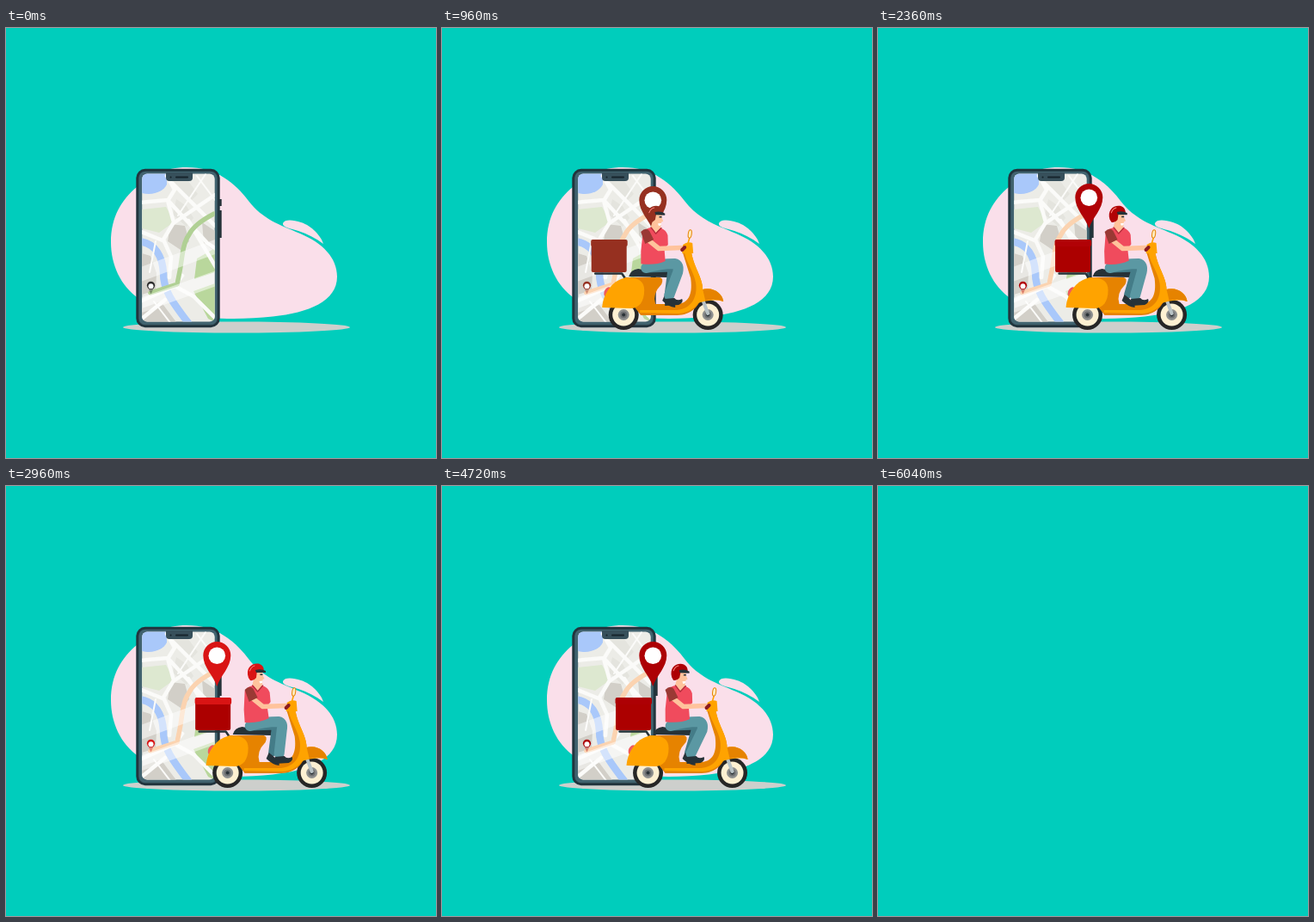
An HTML page that plays this animation: 500 by 500 pixels, repeating every 6080 ms.

```html
<!DOCTYPE html>
<html lang="en">
<head>
<meta charset="utf-8">
<title>Delivery</title>
<style>
html, body { margin: 0; height: 100%; overflow: hidden; background: #00cdbc; }
svg { display: block; width: 100vw; height: 100vh; --red: #d81414; --crate: #ad0000; --route: #fbd3b0; }
.red { fill: var(--red); }
.crate { fill: var(--crate); }
.dark { fill: #263238; }
.line { fill: none; stroke-linecap: round; stroke-linejoin: round; }
</style>
</head>
<body>
<svg viewBox="0 0 500 500">
  <defs>
    <clipPath id="screen"><rect x="158.200" y="169.500" width="84.500" height="172" rx="6"/></clipPath>
    <g id="wheel">
      <circle r="17.5" fill="#262626"/>
      <circle r="13" fill="#fdf0d2"/>
      <circle r="6.5" fill="#8f908f"/>
      <circle r="4" fill="#6e7072"/>
      <circle r="2" fill="#2b3338"/>
    </g>
  </defs>
  <g id="scene">
    <path fill="#fadfea" d="M210 162C245 162 266 180 282 201C298 222 318 229 342 239C368 250 385 267 385 289C385 318 352 331 310 335.500C265 340 205 341 155 315C133 300 122 275 122 249C122 220 134 200 152 185C165 172 185 162 210 162Z"/>
    <path fill="#fadfea" d="M322 227C324 222 334 223 343 226C356 230 367 243 369 251C360 244 350 239.500 340 236C331 233 321 232 322 227Z"/>
    <ellipse cx="268" cy="348" rx="132" ry="6.5" fill="#cdcfcc"/>

    <g id="phone">
      <path class="dark" d="M248 199h2.700v8h-2.700zM248 212h2.700v32h-2.700z"/>
      <rect x="152.8" y="165.3" width="94.4" height="181.4" rx="9" fill="#41636f" stroke="#21343d" stroke-width="3"/>
      <g clip-path="url(#screen)">
        <path fill="#ecece7" d="M158 169h85v173h-85z"/>
        <path fill="#dde8d0" d="M158 211l28 -3 10 17 -18 13 -20 -5z"/>
        <path fill="#d2cfc8" d="M191 228l17 2 5 18 -10 10 -15 -10zM228 226l15 10v24l-13 -10zM158 262l10 3 7 20 -1 20 -16 5zM158 326l22 -8 18 24h-40z"/>
        <path fill="#e4e4de" d="M195 172l14 2 14 19 -9 9 -20 -18zM198 199l12 8 8 14 -8 10 -16 -14z"/>
        <path fill="#b9d79c" d="M218 306l25 -9v45l-8 -4zM222 268l21 -12v28l-24 8z"/>
        <path fill="#a9c8fa" d="M158 169h29v13c-4 8 -15 13 -29 10z"/>
        <path class="line" stroke="#a9c8fa" stroke-width="8.5" d="M154 248C174 250 182 266 183 285C183 305 193 318 212 343"/>
        <g class="line" stroke="#fbfbf9" stroke-width="4.5">
          <path d="M155 203L188 200 234 250 246 258M187 172L196 188 188 201 195 226 183 246 192 266 190 290"/>
          <path d="M155 236L182 247M243 194L196 226M194 181L243 230M212 224L244 278"/>
          <path d="M156 318L196 300 218 312 246 340M185 316L158 338M196 300L205 288"/>
        </g>
        <path class="line" stroke="#fbfbf9" stroke-width="2" d="M232 170L200 218M172 318L192 344M174 248L167 284M222 172L243 200"/>
        <path class="line" stroke="var(--route)" stroke-width="5.500" d="M168 308L199 298Q203 280 205 264T213 240Q219 228 242 216"/>
        <path class="line" stroke="#fff" stroke-opacity=".5" stroke-width="16" d="M150 289L250 252"/>
        <path class="line" stroke="#fff" stroke-opacity=".5" stroke-width="17" d="M158 322L250 289"/>
      </g>
      <path fill="#37505b" d="M186 168h31v6q0 4 -4 4h-23q-4 0 -4 -4z"/>
      <path class="line" stroke="#17252c" stroke-width="2" d="M198 173.5h13M191.5 173.5h.1"/>
      <path class="red" fill-opacity=".4" d="M164.500 301h8l-4 8.500z"/>
      <circle class="red" cx="168.5" cy="299.300" r="4.6"/>
      <circle cx="168.5" cy="300.200" r="3" fill="#fff"/>
    </g>

    <g id="pin">
      <path class="red" d="M245.3 233C241 220 229.3 211 229.3 197a16 16 0 0 1 32 0C261.3 211 249.600 220 245.3 233Z"/>
      <circle cx="245.3" cy="197.300" r="9.8" fill="#fff"/>
    </g>

    <g id="ride">
      <path class="line" stroke="#263238" stroke-width="2.5" d="M224 285.5H255L259 291.500H281"/>
      <path class="crate" d="M219.500 252h41v30q0 2 -2 2h-37q-2 0 -2 -2z"/>
      <rect class="red" x="219" y="246" width="42.5" height="8" rx="2"/>

      <ellipse cx="238.500" cy="307" rx="4" ry="6" fill="#ef5a5c" transform="rotate(25 238.500 307)"/>
      <use href="#wheel" x="257" y="333.500"/>
      <use href="#wheel" x="355" y="333.500"/>
      <path class="line" stroke="#b8c2c5" stroke-width="4" d="M349 316L355 332"/>

      <path fill="#e68300" d="M258 290H299Q304 291 301 298Q290 309 294 321H319C335 320 337 306 335 291L326 262H336C339 280 350 291 349 307C347 323 335 334 319 334H277Q265 318 258 312Z"/>
      <path fill="#ffa300" d="M232 325C233 309 244 294 257 291C272 289 281 293 281 305C281 318 275 326 265 326Z"/>
      <path fill="#ffa300" d="M328 262H336C340 281 350 292 349 307C347 321 336 331 321 332L276 331V328H319C337 326 343 312 341 297C339 284 331 275 328 262Z"/>
      <path fill="#ffa300" d="M340 321C342 307 348 302 355 303C365 304 372 310 373 318Q361 314 340 321Z"/>
      <path fill="#e68300" d="M349 304C362 301 372 309 373 318Q363 314 352 317Z"/>
      <path class="dark" d="M263 289Q265 281 274 280Q286 283 306 281Q311 284 308 290Z"/>
      <path class="line" stroke="#ffa300" stroke-width="1.600" d="M331 253L334 243"/>
      <ellipse cx="334" cy="239.500" rx="2" ry="4.800" fill="#fdebc0" stroke="#e68300" transform="rotate(8 334 240)"/>
      <path fill="#ffa300" d="M326 252Q331 248 337 250L338 262H325Z"/>

      <path id="backLeg" class="line" stroke="#447c88" stroke-width="9"/>
      <g id="backShoe"><path class="dark" d="M305 310L310 314 317 321 317 325Q309 324 302 317Z"/></g>
      <path id="frontLeg" class="line" stroke="#5b98a3" stroke-width="12"/>
      <g id="frontShoe"><path class="dark" d="M312 315L323 314Q326 318 332 315Q334 319 328 322L312 323Z"/></g>

      <g id="torso">
        <path fill="#ffc39c" d="M287 226h9l2 10 -6 4 -7 -5z"/>
        <path fill="#f04b5d" d="M277 238Q280 233 287 232L292 238 297 232Q304 234 306 240L307 251 303 256 305 270Q294 276 277 275L276 260Z"/>
        <path class="line" stroke="#b52e3c" stroke-width="1.300" d="M286 232L292 239 298 232"/>
        <g transform="translate(-.7 1)">
          <path fill="#ffc39c" d="M288 213h10l.5 6 2 4 -2 1 -.5 6q-4 3 -7 0l-4 -7z"/>
          <path fill="#fff" d="M294.500 226l4 -.5 -.5 2.500 -2.500 .5z"/>
          <path class="dark" d="M295.500 217.500h3v1.500h-3z"/>
          <path class="red" d="M282 222C278 210 287 204 295 206Q300 208 300 214H292L291 222Q288 226 284 225Z"/>
          <path class="dark" d="M290 213Q297 211 302 214L302 216 291 216Z"/>
          <path class="line" stroke="#ff8781" stroke-width="1" d="M283.500 214Q285 209 289 208"/>
        </g>
      </g>
      <path class="line" stroke="#ffc39c" stroke-width="5.500" d="M285 246L298 256.500 324 255.500"/>
      <path fill="#9a3934" d="M277 237Q283 231 287 236L292 246 282 251Z"/>
      <path class="line" stroke="#8b1c22" stroke-width="4" d="M325 258L328 255"/>
    </g>
  </g>
</svg>
<script>
const LOOP = 6080;
const $ = id => document.getElementById(id);
const svg = document.querySelector('svg');
const clamp = v => Math.max(0, Math.min(1, v));

// Linear interpolation through rows of [time, ...values].
function track(rows, t) {
  const i = rows.findIndex(r => r[0] > t);
  if (i < 0) return rows[rows.length - 1].slice(1);
  if (!i) return rows[0].slice(1);
  const a = rows[i - 1], b = rows[i], k = (t - a[0]) / (b[0] - a[0]);
  return a.slice(1).map((v, j) => v + (b[j + 1] - v) * k);
}

const reds = [[0, 45, 45, 45], [300, 150, 48, 32], [960, 150, 48, 32], [1500, 170, 0, 4],
  [2300, 172, 0, 4], [2900, 217, 20, 20], [4050, 217, 20, 20], [4600, 173, 0, 4]];
const crates = [[960, 150, 48, 32], [1500, 172, 0, 0]];
const routes = [[0, 176, 208, 148], [300, 251, 211, 176]];
// Offsets of the front foot, the back foot, and the lean in degrees.
const poses = [[0, -7, 0, 3.5], [960, -7, 0, 3.5], [1760, -9, -10, 3.5], [2960, 0, 0, 0],
  [3920, 1, 0, 0], [4720, -10, -5, 3.5], [5760, -7, 0, 3.5]];

const move = (id, x, y = 0) => $(id).setAttribute('transform', `translate(${x} ${y})`);
const paint = (name, rows, t) => svg.style.setProperty(name, `rgb(${track(rows, t)})`);

function draw(t) {
  const angle = (t - 3470) * 2 * Math.PI / LOOP;
  const [front, back, lean] = track(poses, t);
  paint('--red', reds, t);
  paint('--crate', crates, t);
  paint('--route', routes, t);

  $('scene').style.opacity = clamp((6040 - t) / 280);
  $('ride').style.opacity = $('pin').style.opacity = clamp(t / 640);
  move('ride', -23.5 + 27 * Math.cos(angle) + 1.6 * Math.cos(2 * angle));
  move('pin', 0, 3 * clamp((1500 - t) / 540));
  move('frontShoe', front);
  move('backShoe', back);
  $('frontLeg').setAttribute('d', `M283 279Q300 274 316 274Q322 275 320 284L${317 + front} 311`);
  $('backLeg').setAttribute('d', `M284 280L313 279 ${309 + back} 310`);
  $('torso').setAttribute('transform', `rotate(${lean} 290 278)`);
}

const start = performance.now();
function tick() {
  draw((performance.now() - start) % LOOP);
  requestAnimationFrame(tick);
}
draw(0);
requestAnimationFrame(tick);
</script>
</body>
</html>
```
